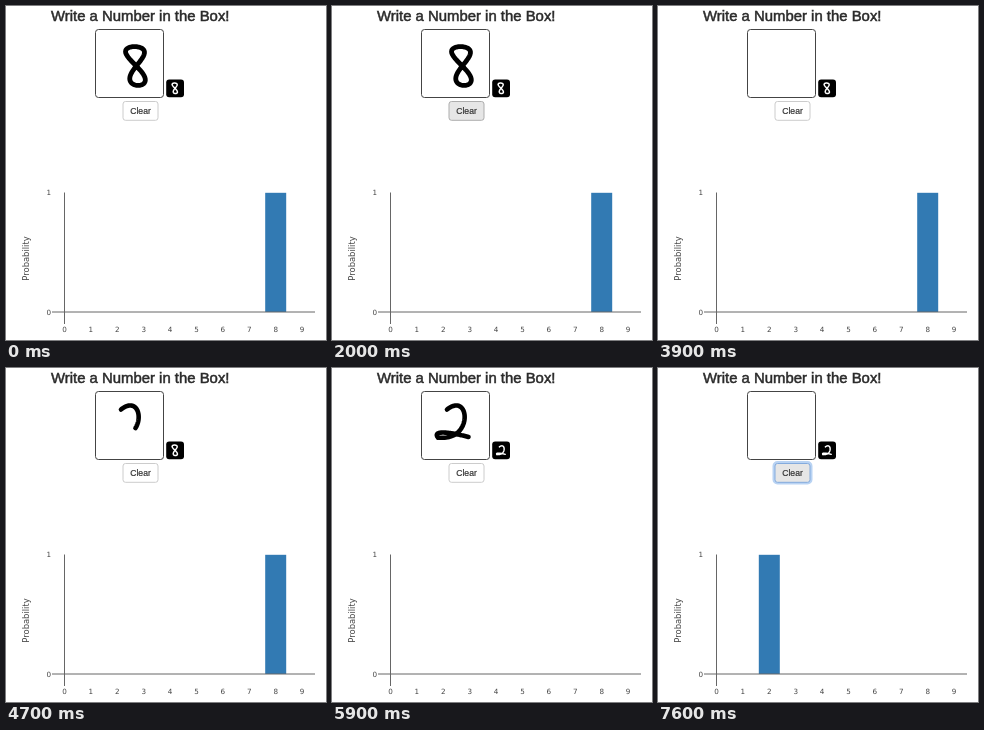
Recreate the animation shown at these times as an HTML page with a canvas. Size 320 px wide and 334 px high, loop 8 s.

```html
<!DOCTYPE html>
<html lang="en">
<head>
<meta charset="utf-8">
<title>Number box</title>
<style>
  html, body { margin: 0; width: 100%; height: 100%; overflow: hidden; background: #fff; }
  canvas { display: block; width: 320px; height: 334px; }
</style>
</head>
<body>
<canvas id="stage"></canvas>
<script>
const LOOP = 8000;
const SANS = '"Liberation Sans", Arial, sans-serif';
const CHART = '"DejaVu Sans", Verdana, sans-serif';

const canvas = document.getElementById('stage');
const ctx = canvas.getContext('2d');
const ratio = window.devicePixelRatio || 1;
canvas.width = 320 * ratio;
canvas.height = 334 * ratio;

// Leaning figure of eight, narrower at the bottom.
function eight(u) {
  const a = u * 2 * Math.PI;
  const v = -Math.cos(a);
  return [130.3 + 1.8 * v + (8.6 - 1.2 * v) * Math.sin(2 * a), 60 + 19.4 * v];
}

const bezier = (a, b, c, d) => u => a.map((start, i) => {
  const w = 1 - u;
  return w * w * w * start + 3 * w * w * u * b[i] + 3 * w * u * u * c[i] + u * u * u * d[i];
});
const hook = bezier([115, 41.5], [138, 23], [142, 74], [106, 69.5]);
const foot = bezier([106, 69.5], [100, 62], [118, 64], [136.5, 69]);

function text(str, x, y, size, family, color, align = 'center', weight = 0) {
  ctx.font = `${size}px ${family}`;
  ctx.textAlign = align;
  ctx.fillStyle = ctx.strokeStyle = color;
  ctx.fillText(str, x, y);
  if (weight) {
    ctx.lineWidth = weight;
    ctx.strokeText(str, x, y);
  }
}

function line(x1, y1, x2, y2) {
  ctx.beginPath();
  ctx.moveTo(x1, y1);
  ctx.lineTo(x2, y2);
  ctx.stroke();
}

function box(x, y, w, h, r, fill, stroke, width = 1) {
  ctx.beginPath();
  ctx.roundRect(x, y, w, h, r);
  if (fill) {
    ctx.fillStyle = fill;
    ctx.fill();
  }
  if (stroke) {
    ctx.strokeStyle = stroke;
    ctx.lineWidth = width;
    ctx.stroke();
  }
}

// Draws a curve from its start up to the given part of its length.
function pen(curve, part, color, width) {
  if (part <= 0) return;
  const end = Math.min(part, 1);
  ctx.strokeStyle = color;
  ctx.lineWidth = width;
  ctx.lineCap = ctx.lineJoin = 'round';
  ctx.beginPath();
  for (let i = 0; i <= 60; i++) ctx.lineTo(...curve(end * i / 60));
  ctx.stroke();
  ctx.lineCap = 'butt';
  ctx.lineJoin = 'miter';
}

function drawEight(color, width) {
  pen(eight, 1, color, width);
}

// The hook takes 9 steps, the foot 6.
function drawTwo(color, width, step = 15) {
  pen(hook, step / 9, color, width);
  pen(foot, (step - 9) / 6, color, width);
}

function thumbnail(digit, cx, cy) {
  box(160.2, 73.5, 17.8, 17.8, 3, '#000');
  ctx.save();
  ctx.translate(169, 82.3);
  ctx.scale(0.27, 0.27);
  ctx.translate(-cx, -cy);
  digit('#fff', 5.4);
  ctx.restore();
}

function button(hover, focus) {
  if (focus) {
    ctx.globalAlpha = focus;
    box(116, 94.5, 37, 20.5, 3.5, null, '#b9d3f3', 3);
    ctx.globalAlpha = 1;
  }
  const edge = focus ? '#84abdd' : hover ? '#adadad' : '#ccc';
  box(117, 95.5, 35, 18.8, 2.5, hover ? '#e6e6e6' : '#fff', edge);
  text('Clear', 134.5, 107.8, 8.6, SANS, '#333', 'center', 0.2);
}

function chart(digit) {
  const column = i => 58.5 + 26.4 * i;
  if (digit !== null) {
    ctx.fillStyle = '#327ab3';
    ctx.fillRect(column(digit) - 10.5, 186.8, 21, 119.2);
  }
  ctx.strokeStyle = '#666';
  ctx.lineWidth = 1;
  line(58.5, 186.5, 58.5, 318);
  line(46, 306, 309, 306);
  for (let i = 0; i < 10; i++) text(i, column(i), 326, 7.2, CHART, '#444');
  text('1', 45, 189.3, 7.2, CHART, '#444', 'right');
  text('0', 45, 309, 7.2, CHART, '#444', 'right');
  ctx.save();
  ctx.translate(22.5, 252.5);
  ctx.rotate(-Math.PI / 2);
  text('Probability', 0, 0, 8.4, CHART, '#444');
  ctx.restore();
}

function draw(t) {
  const within = (a, b) => t >= a && t < b;
  ctx.setTransform(ratio, 0, 0, ratio, 0, 0);
  ctx.fillStyle = '#fff';
  ctx.fillRect(0, 0, 320, 334);

  text('Write a Number in the Box!', 45, 15, 14.9, SANS, '#2b2b2b', 'left', 0.5);

  box(89.5, 23.5, 68, 68, 3, '#fff', '#444');
  if (t < 2600) drawEight('#000', 4.8);
  else if (within(4200, 7600)) drawTwo('#000', 4.6, Math.floor((t - 4200) / 100) + 1);

  if (t < 5900) thumbnail(drawEight, 130.3, 60);
  else thumbnail(drawTwo, 121, 54);

  const focus = within(2600, 2700) ? 0.5 : within(2700, 3900) || t >= 7600 ? 1 : 0;
  button(within(2000, 3900) || t >= 6800, focus);
  chart(t < 5900 ? 8 : t < 6000 ? null : 2);
}

const start = performance.now();
function tick() {
  draw((performance.now() - start) % LOOP);
  requestAnimationFrame(tick);
}
tick();
</script>
</body>
</html>
```
